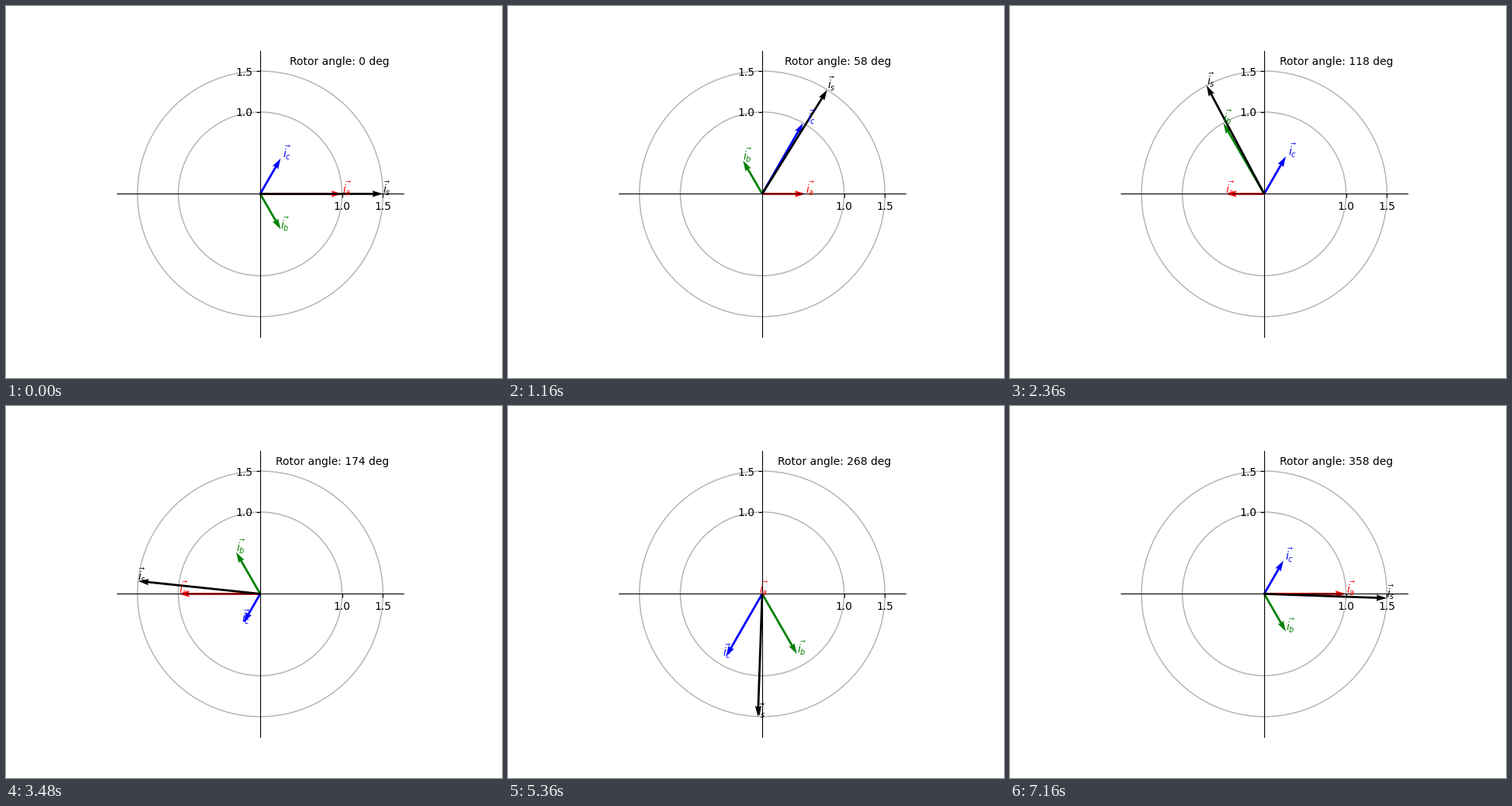
A matplotlib script that plays this animation: 640 by 480 pixels, repeating every 7.2 s.

```python
import numpy as np
import matplotlib.pyplot as plt
from matplotlib.animation import FuncAnimation

FRAMES = 180
STEP = 2            # degrees per frame
LIMIT = 1.75

fig, ax = plt.subplots(figsize=(6.4, 4.8), dpi=100)
ax.set_aspect("equal")
ax.set(xlim=(-LIMIT, LIMIT), ylim=(-LIMIT, LIMIT),
       xticks=[1.0, 1.5], yticks=[1.0, 1.5])
for side in ("left", "bottom"):
    ax.spines[side].set_position("zero")
for side in ("right", "top"):
    ax.spines[side].set_visible(False)

for radius in (1.0, 1.5):
    ax.add_patch(plt.Circle((0, 0), radius, fill=False, ec="#b0b0b0", lw=1))


class Phasor:
    """Arrow from the origin with a label at its tip."""

    def __init__(self, name, color, label_scale=1.0):
        self.label_scale = label_scale
        self.arrow = ax.quiver(0, 0, 1, 0, color=color, angles="xy",
                               scale_units="xy", scale=1)
        self.label = ax.text(0, 0, rf"$\vec{{i_{name}}}$", color=color)

    def set(self, length, angle):
        x, y = length * np.cos(angle), length * np.sin(angle)
        self.arrow.set_UVC(x, y)
        self.label.set_position((x * self.label_scale, y))


phases = [
    (Phasor("a", "red"), 0.0),
    (Phasor("b", "green"), np.radians(120)),
    (Phasor("c", "blue", 1.1), np.radians(240)),
]
stator = Phasor("s", "black")
readout = ax.text(0.95, 0.95, "", ha="right", transform=ax.transAxes)


def update(frame):
    degrees = frame * STEP
    theta = np.radians(degrees)
    for phasor, axis in phases:
        phasor.set(np.cos(theta - axis), axis)
    stator.set(1.5, theta)
    readout.set_text(f"Rotor angle: {degrees} deg")
    return []


anim = FuncAnimation(fig, update, frames=FRAMES, interval=40,
                     repeat=True, repeat_delay=0)
plt.show()
```
